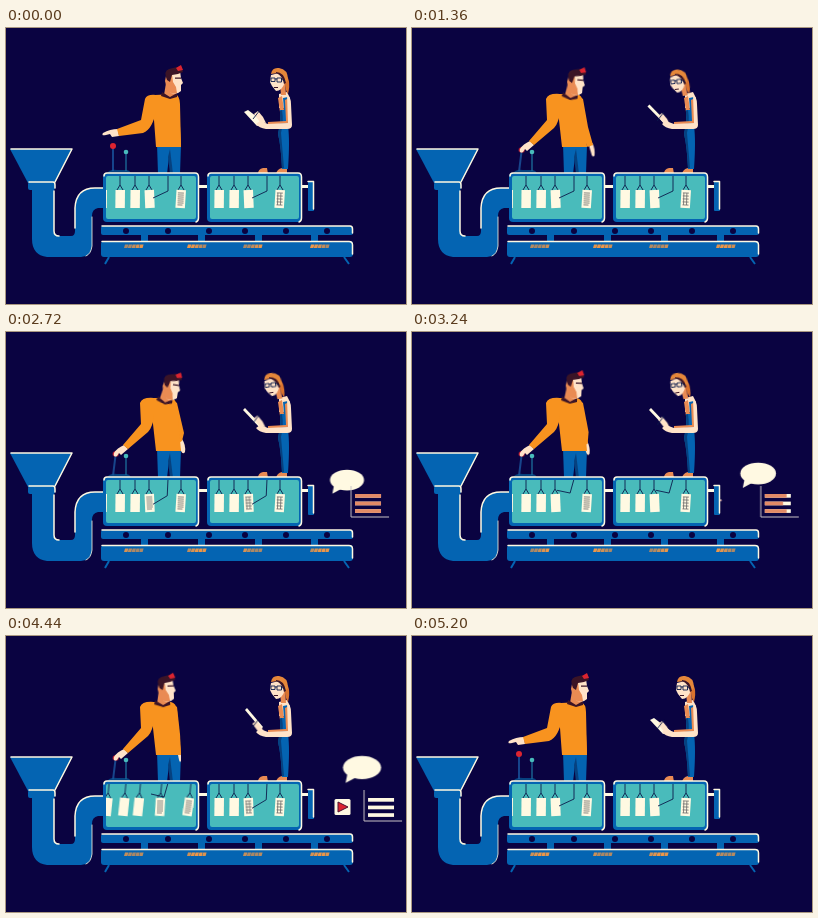
Write an HTML page that moves like this. It is 400 px wide and 276 px high and loops after 5240 ms.

```html
<!DOCTYPE html>
<html lang="en">
<head>
<meta charset="utf-8">
<title>Content machine</title>
<style>
html, body { margin: 0; width: 100%; height: 100%; overflow: hidden; background: #0a0341; }
svg { display: block; width: 100%; height: 100%; }

.navy { fill: #0a0341; }
.blue { fill: #0464b2; }
.deep { fill: #06417f; }
.teal { fill: #49bbbb; }
.cream { fill: #fff9e2; }
.orange { fill: #f8931f; }
.skin { fill: #ffe3c8; }
.tan { fill: #e98b53; }
.hair { fill: #3b1426; }
.red { fill: #dc2430; }
.edge { fill: none; stroke: #fff9e2; stroke-width: 1.5; stroke-linecap: round; stroke-linejoin: round; }
.wire { fill: none; stroke: #0d1c4c; stroke-width: .9; stroke-linejoin: round; }
.ink { fill: none; stroke: #6d6c6c; stroke-width: .8; }

.move { animation: 5240ms ease-in-out infinite both; }

/* Man */
.sleeve { animation-name: sleeve; }
@keyframes sleeve {
  0%, 1%, 99%, 100% { d: path("M150,67 Q141,66 139,71 L135,92 L111,101 L113,108 L137,105 Q147,101 150,82 Z"); }
  9%, 95% { d: path("M148,66 Q136,65 134,71 L135,92 L117,113 L122,117 L142,100 Q147,95 148,82 Z"); }
}
.grip { animation-name: grip; }
@keyframes grip {
  0%, 1%, 99%, 100% { d: path("M112,101 Q104,101 97,105 Q95,108 100,107 L104,106 L106,109 L113,108 Z"); }
  9%, 95% { d: path("M118,113 Q111,116 108,121 Q107,126 111,124 L113,121 L115,123 L122,117 Z"); }
}
.torso { animation-name: torso; }
@keyframes torso {
  0%, 99%, 100% { d: path("M149,67 L169,66 Q174,68 174,76 L175,119 L150,119 L148,92 Q142,78 149,67 Z"); }
  9%, 95% { d: path("M146,66 L165,66 Q170,67 171,74 L175,119 L150,119 L147,92 Q140,76 146,66 Z"); }
}
.side { animation-name: side; }
@keyframes side {
  0%, 4%, 34%, 38.9%, 70.2%, 100% { d: path("M163,66 L171,71 L174,98 L175,117 L170,118 L166,95 Z"); }
  12.2%, 18% { d: path("M163,66 L171,71 L178,100 L187,117 L181,120 L168,100 Z"); }
  51.9%, 56% { d: path("M163,66 L171,71 L178,101 L176,109 L171,112 L168,98 Z"); }
}
.palm { animation-name: palm; }
@keyframes palm {
  0%, 4%, 100% { transform: translate(170px, 110px) scale(.6); }
  12.2%, 18% { transform: translate(184px, 118px); }
  34%, 38.9%, 70.2%, 94% { transform: translate(172px, 114px) scale(.5, .9); }
  51.9%, 56% { transform: translate(173px, 108px); }
}
.head { transform-origin: 167px 63px; animation-name: head; }
@keyframes head {
  0%, 2%, 99%, 100% { transform: none; }
  12.2%, 18%, 51.9% { transform: translate(-4px, 2px) rotate(9deg); }
  38.9%, 70.2%, 95% { transform: translate(-7px, 0) rotate(-2deg); }
}
.lever { transform-origin: 108px 144px; animation-name: lever; }
@keyframes lever {
  0%, 6%, 96%, 100% { transform: none; }
  9.5%, 94% { transform: rotate(7deg) scaleY(.85); }
}

/* Woman */
.face { transform-origin: 277px 64px; animation-name: face; }
@keyframes face {
  0%, 3%, 34%, 40%, 82%, 100% { transform: none; }
  12.2%, 22% { transform: translate(-6px, 1px) rotate(-10deg); }
  51.9%, 72% { transform: translate(-4px, 0) rotate(-9deg); }
}
.pad { animation-name: pad; }
@keyframes pad {
  0%, 3%, 97%, 100% { d: path("M238,84 L242,82 L259,95 L251,98 Z"); }
  12.2%, 22% { d: path("M235,79 L237,77 L254,94 L252,96 Z"); }
  38.9%, 84.7%, 91% { d: path("M239,74 L241,72 L257,91 L255,93 Z"); }
  51.9%, 72% { d: path("M237,78 L239,76 L256,94 L254,96 Z"); }
}
.pen { animation: pen 480ms ease-in-out infinite alternate; }
@keyframes pen { from { transform: none; } to { transform: translate(-2px, 2px); } }

/* Sheets dropping into the funnel */
.sheet { opacity: 0; animation: fall 5240ms linear infinite backwards; }
@keyframes fall {
  0% { opacity: 0; transform: translate(49px, 17px) rotate(12deg) scale(.3); }
  1.5% { opacity: 1; transform: translate(48px, 27px) rotate(7deg) scale(.75); }
  10.7% { opacity: 1; transform: translate(30px, 99px) rotate(-14deg); }
  13.3% { opacity: 1; transform: translate(35px, 138px) rotate(-4deg) scale(.8); }
  13.4%, 100% { opacity: 0; transform: translate(35px, 138px) scale(.8); }
}

/* Results leaving on the right */
.flange { animation-name: flange; }
@keyframes flange {
  0%, 37%, 43%, 100% { transform: none; }
  39% { transform: translateX(2px); }
}
.bubble { animation-name: bubble; animation-timing-function: ease-out; }
@keyframes bubble {
  0%, 39.7% { transform: translate(306px, 168px) scale(0); }
  51.9% { transform: translate(341px, 148px) scale(.92); animation-timing-function: linear; }
  70.2% { transform: translate(350.5px, 136px); animation-timing-function: linear; }
  84.7% { transform: translate(356px, 131.5px) scale(1.03); animation-timing-function: linear; }
  90% { transform: translate(357px, 130px) scale(1.03); }
  95.5%, 100% { transform: translate(357px, 130px) scale(0); }
}
.chart { animation-name: chart; animation-timing-function: linear; }
@keyframes chart {
  0%, 39.7% { transform: translate(308px, 170px) scale(0); }
  48% { transform: translate(343.5px, 185px); }
  51.9% { transform: translate(345px, 185px); }
  70.2% { transform: translate(352px, 185px); }
  84.7% { transform: translate(358px, 185px); }
  90% { transform: translate(360px, 185px); }
  95.5%, 100% { transform: translate(360px, 185px) scale(0); }
}
.bar { fill: #e28a66; animation-name: bar; }
@keyframes bar {
  0%, 53% { transform: none; }
  70.2% { transform: scaleX(var(--part)); }
  82%, 100% { transform: scaleX(0); }
}
.tile { animation-name: tile; }
@keyframes tile {
  0%, 60% { transform: translate(306px, 168px) scale(0); }
  68%, 73% { transform: translate(330px, 170.5px); }
  78% { transform: translate(333px, 171px) scale(0, 1); }
  82%, 90% { transform: translate(336px, 171px); }
  95%, 100% { transform: translate(338px, 171px) scale(0); }
}
.like { animation: like 5240ms step-end infinite; }
.play { animation: play 5240ms step-end infinite; }
@keyframes like { 0% { opacity: 1; } 78% { opacity: 0; } }
@keyframes play { 0% { opacity: 0; } 78% { opacity: 1; } }

.lamp { animation: lamp 800ms ease-in-out infinite alternate; }
@keyframes lamp { from { opacity: .7; } to { opacity: 1; } }
</style>
</head>
<body>
<svg viewBox="0 0 400 276">
  <defs>
    <clipPath id="pane0"><rect x="100" y="148" width="90" height="43" rx="2"/></clipPath>
    <clipPath id="pane1"><rect x="204" y="148" width="89" height="43" rx="2"/></clipPath>
    <g id="page">
      <path class="cream" d="M-10,-18 H10 V18 H-10 Z"/>
      <path class="ink" d="M-7,-13 H7 M-7,-10 H7 M-7,-7 H7 M-7,-4 H7 M-7,-1 H7 M-7,2 H7 M-7,5 H7 M-7,8 H7 M-7,11 H3"/>
    </g>
  </defs>

  <g class="sheet" style="animation-delay:80ms"><use href="#page"/></g>
  <g class="sheet" style="animation-delay:560ms"><use href="#page"/></g>

  <!-- Funnel and pipe -->
  <path class="blue" d="M26,160 H48 V203 Q48,208 53,208 H65 Q69,208 69,203 V180 Q70,160 89,160 H99 V180 H92 Q86,181 86,188 V218 Q85,229 75,229 H41 Q26,227 26,211 Z"/>
  <path class="edge" d="M48,163 V203 Q48,208 53,208 M69,200 V180 Q70,160 89,160 H97"/>
  <path class="edge" d="M86,189 V218 Q85,226 80,228" style="stroke-width:.8"/>
  <path class="blue" d="M4,121 H66 L49,155 H22 Z"/>
  <path class="edge" d="M5,121 H66 L49,154"/>
  <rect class="blue" x="22" y="154" width="27" height="8" rx="2"/>
  <path class="edge" d="M23,154 H47 Q49,154 49,157 V160"/>

  <!-- Stand -->
  <path d="M103,229 L99,236 M338,229 L343,236" fill="none" stroke="#0464b2" stroke-width="2"/>
  <path class="blue" d="M135,206 h7 v8 h-7 Z M192,206 h7 v8 h-7 Z M249,206 h7 v8 h-7 Z M305,206 h7 v8 h-7 Z"/>
  <rect class="blue" x="95" y="198" width="252" height="9" rx="2"/>
  <path class="edge" d="M96,198 H344 Q346.500,198 346.500,201 V205"/>
  <rect class="blue" x="95" y="213" width="252" height="16" rx="3"/>
  <path class="edge" d="M96,213.500 H343 Q346.500,213.500 346.500,217 V226"/>
  <g id="wheels" class="navy"></g>
  <g id="lamps" fill="#ee9748"></g>

  <!-- Man -->
  <path class="blue" d="M151,116 L175,117 L174,146 H165 L163,129 L161,146 H152 Z"/>
  <path class="deep" d="M164,121 L167,146 H164 L162,129 Z"/>
  <path class="skin move palm" d="M-2,0 L3,-1 Q7,5 6,12 Q4,15 2,11 Z"/>
  <path class="orange move side" d="M163,66 L171,71 L174,98 L175,117 L170,118 L166,95 Z"/>
  <path class="orange move torso" d="M149,67 L169,66 Q174,68 174,76 L175,119 L150,119 L148,92 Q142,78 149,67 Z"/>
  <g class="move head">
    <path class="tan" d="M160,55 L169,60 L170,67 Q164,71 158,67 Z"/>
    <path class="hair" d="M156,64 L164,69 L171,65 L171,69 L164,71 L155,68 Z"/>
    <path class="skin" d="M161,46 L174,43 L175,50 L177,55 L175,57 L175,63 Q171,67 165,65 L160,56 Z"/>
    <path class="tan" d="M160,48 L166,46 L167,54 L170,59 L171,65 Q165,67 161,61 L159,53 Z"/>
    <path class="hair" d="M161,52 Q157,43 163,41 L175,38 L177,44 Q171,47 166,47 L164,54 Z M169,49.500 h6 v1.300 h-6 Z"/>
    <path class="red" d="M170,40 L175,37 L177,42 L172,43 Z"/>
  </g>

  <!-- Levers -->
  <path class="deep" d="M101,146 Q103,141 111,142 H120 Q124,142 125,146 Z"/>
  <path d="M120,143 V124" fill="none" stroke="#1c6f9c" stroke-width="1.300"/>
  <circle class="teal" cx="120" cy="124" r="2.300"/>
  <g class="move lever">
    <path d="M107,143 V118" fill="none" stroke="#1b5ba5" stroke-width="1.500"/>
    <circle class="red" cx="107" cy="118" r="3"/>
  </g>
  <path class="skin move grip" d="M112,101 Q104,101 97,105 Q95,108 100,107 L104,106 L106,109 L113,108 Z"/>
  <path class="orange move sleeve" d="M150,67 Q141,66 139,71 L135,92 L111,101 L113,108 L137,105 Q147,101 150,82 Z"/>

  <!-- Woman -->
  <path class="tan" d="M252,146 Q252,141 257,140 L261,140 L262,146 Z M270,146 Q271,141 276,140 L281,140 L281,146 Z"/>
  <path class="skin" d="M273,66 L281,64 L284,70 L282,80 L273,80 Z"/>
  <path class="tan" d="M272,70 L276,68 L278,82 L274,84 Z"/>
  <path class="blue" d="M277,70 L282,69 Q284,86 282,98 Q284,112 282,141 H276 Q275,118 272,106 Q275,92 274,82 L278,82 Z"/>
  <path class="deep" d="M274,83 L276,82 Q278,94 275,105 L278,140 H276 Q275,118 272,106 Q275,94 274,83 Z"/>
  <g class="move face">
    <path d="M277,44 Q286,50 282,66 Q279,62 279,55 Z" fill="#d9722e"/>
    <path class="tan" d="M274,56 L279,54 L280,67 L275,67 Z"/>
    <path class="skin" d="M265,47 L277,44 L279,54 Q276,63 270,63 L266,58 L264,54 Z"/>
    <path d="M265,46 Q266,39 273,40 Q282,41 282,52 L279,56 Q278,48 272,45 Z" fill="#e5873a"/>
    <path class="hair" d="M270,44 Q278,44 280,55 L278,56 Q277,48 270,45 Z M268,59 h4 v1 h-4 Z"/>
    <path class="wire" d="M265,50 h4 v3.500 h-4 Z M271,50 h4.500 v4 h-4.500 Z M269,51 h2 M275,51 l4,2"/>
  </g>
  <path class="cream move pad" d="M238,84 L242,82 L259,95 L251,98 Z"/>
  <path class="tan" d="M279,72 L283,70 L283,95 L262,97 L262,94 L280,93 Z"/>
  <path class="skin" d="M281,67 Q285,69 285,76 L286,97 Q286,101 281,101 L260,101 Q253,100 250,96 L254,93 L262,96 L282,95 Z"/>
  <g class="pen">
    <path class="skin" d="M248,86 L252,83 L257,89 L260,95 L254,94 Z"/>
    <path class="wire" d="M247,91 L254,82"/>
  </g>

  <!-- Results -->
  <g class="move bubble">
    <ellipse class="cream" rx="18.500" ry="11.300"/>
    <path class="cream" d="M-14,5 L-16,15 L-5,9 Z"/>
  </g>
  <g class="move chart">
    <path d="M0,-31 V0 H38" fill="none" stroke="#c9c3c6" stroke-width="1"/>
    <g id="bars"></g>
  </g>
  <g class="move tile">
    <g class="like">
      <path class="cream" d="M0,-11 L11,0 L0,11 L-11,0 Z"/>
      <path class="red" d="M0,5 L-5,-.5 Q-5,-5 -1.500,-4 L0,-2 L2,-4 Q5,-4 5,-.5 Z"/>
    </g>
    <g class="play">
      <rect class="cream" x="-7.500" y="-8" width="16" height="16" rx="1.500"/>
      <path class="red" d="M-4,-5 L6,0 L-4,5 Z" stroke="#4b1330" stroke-width="1"/>
    </g>
  </g>

  <!-- Machine -->
  <path class="cream" d="M191,157 h11 v3 h-11 Z M295,157 h8 v3 h-8 Z"/>
  <g class="move flange">
    <rect class="blue" x="302" y="153" width="6" height="30" rx="1"/>
    <path class="edge" d="M302,153.500 H307.500 V181"/>
  </g>
  <g id="boxes"></g>
</svg>

<script>
const LOOP = 5240;
const $ = id => document.getElementById(id);

function add(parent, tag, attrs) {
  const el = document.createElementNS('http://www.w3.org/2000/svg', tag);
  for (const key in attrs) el.setAttribute(key, attrs[key]);
  return parent.appendChild(el);
}

function loop(el, frames) {
  const list = frames.map(([ms, style, easing = 'linear']) => ({ offset: ms / LOOP, easing, ...style }));
  el.animate(list, { duration: LOOP, iterations: Infinity });
}

for (const cx of [120, 162, 203, 239, 280, 321]) add($('wheels'), 'circle', { cx, cy: 203, r: 3 });

[118, 181, 237, 304].forEach((x, g) => {
  for (let i = 0; i < 5; i++) {
    add($('lamps'), 'path', {
      class: 'lamp', d: `M${x + 1 + i * 3.8},216.5 h3.4 l-1,3.5 h-3.4 Z`,
      style: `animation-delay:${-(g * 5 + i) * 160}ms`
    });
  }
});

[.7, .45, .7].forEach((part, i) => {
  const box = { y: -23 + i * 7.6, width: 26, height: 3.7 };
  add($('bars'), 'rect', { ...box, x: 4, class: 'cream' });
  const slot = add($('bars'), 'g', { transform: 'translate(4 0)' });
  add(slot, 'rect', { ...box, class: 'move bar', style: `--part:${part}` });
});

const SLOTS = [96, 114, 129, 143, 175, 200];
const STEP = 220;
const TEXT = 'M-3,3 H3 M-3,5 H3 M-3,7 H3 M-3,9 H3 M-3,11 H3 M-3,13 H3 M-3,15 H2';
const GRID = 'M-3,3 H3 M-3,6 H3 M-3,9 H3 M-3,12 H3 M-3,15 H3 M-2,3 V15 M1,3 V15';

// Each paper swings to the next slot at every start, then takes over its own slot again.
function hangPaper(parent, k, shift, starts, marks) {
  const hang = (x, sway) => ({ transform: `translate(${x + shift}px, 147px) rotate(${sway}deg)` });
  const from = hang(SLOTS[k], 0), to = hang(SLOTS[k + 1], 0);
  const middle = hang((SLOTS[k] + SLOTS[k + 1]) / 2, 7);
  const paper = add(parent, 'g');
  add(paper, 'path', { class: 'wire', d: 'M0,0 V10 M-3,15 L0,10 L3,15' });
  const tilt = k === 3 ? -4 : k === 4 ? 2 : -1;
  const page = add(paper, 'g', { transform: `translate(0 15) rotate(${tilt})` });
  add(page, 'path', { class: 'cream', d: 'M-4.500,0 H5 L4.500,18 H-5 Z' });

  const path = [[0, from]];
  for (const s of starts) path.push([s, from, 'ease-in'], [s + STEP / 2, middle, 'ease-out'], [s + STEP, to], [s + STEP, from]);
  loop(paper, [...path, [LOOP, from]]);

  if (k < 3) return;
  const ink = add(page, 'path', { class: 'ink', d: marks });
  if (k === 4) return;
  const off = { opacity: 0 }, on = { opacity: 1 };
  const fade = [[0, off]];
  for (const s of starts) fade.push([s - 330, off], [s - 290, on], [s + STEP, on], [s + STEP, off]);
  loop(ink, [...fade, [LOOP, off]]);
}

function hangArm(parent, shift, starts) {
  const pose = (ex, ey, tx, ty) => ({ d: `path("M162,147 L${ex},${ey} L${tx},${ty}")` });
  const rest = pose(162, 163, 147, 170);
  const low = pose(161, 164, 147, 173);
  const up = pose(158, 161, 145, 158);
  const holder = add(parent, 'g', { transform: `translate(${shift} 0)` });
  const arm = add(holder, 'path', { class: 'wire', d: 'M162,147 L162,163 L147,170' });
  const path = [[0, rest]];
  for (const s of starts) {
    path.push([s - 330, rest], [s - 250, low], [s - 170, rest], [s - 90, low], [s, rest], [s + 90, up], [s + 250, up], [s + 290, rest]);
  }
  loop(arm, [...path, [LOOP, rest]]);
}

const BOXES = [
  { x: 97, width: 96, shift: 0, starts: [340, 1790, 2990, 4345], marks: TEXT },
  { x: 201, width: 95, shift: 99, starts: [350, 1930, 2990, 4550], marks: GRID }
];

BOXES.forEach(({ x, width, shift, starts, marks }, i) => {
  const box = $('boxes'), right = x + width;
  add(box, 'rect', { class: 'blue', x, y: 145, width, height: 49, rx: 4 });
  add(box, 'rect', { class: 'teal', x: x + 3, y: 148, width: width - 6, height: 43, rx: 2 });
  add(box, 'path', { class: 'edge', d: `M${x + 1},148 Q${x + 1},145 ${x + 4},145 H${right - 4} Q${right - .5},145 ${right - .5},149 V190 Q${right - .5},193 ${right - 3},194` });
  const inside = add(box, 'g', { 'clip-path': `url(#pane${i})` });
  for (let k = 0; k < 5; k++) hangPaper(inside, k, shift, starts, marks);
  hangArm(inside, shift, starts);
});
</script>
</body>
</html>
```
